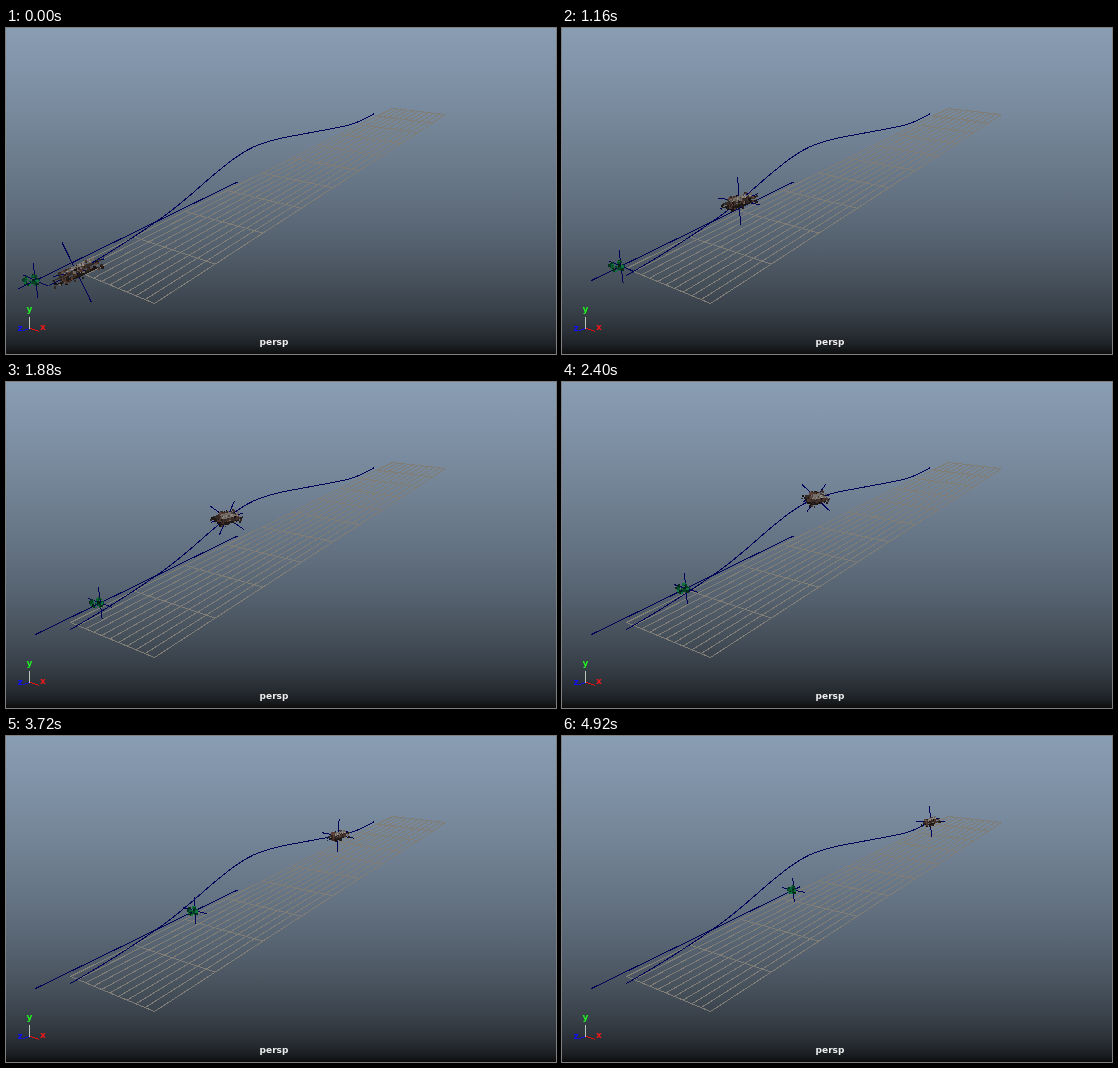
Recreate the animation shown at these times as an HTML page. Size 550 by 326 pixels, loop 5040 ms.

```html
<!DOCTYPE html>
<html lang="en">
<head>
<meta charset="utf-8">
<title>Viewport</title>
<style>
  html, body { margin: 0; width: 100%; height: 100%; overflow: hidden; background: #0d0d0d; }
  svg { display: block; width: 550px; height: 326px; shape-rendering: crispEdges; }
  path { fill: none; stroke: #000058; }
  text { font: bold 9px "DejaVu Sans", sans-serif; }
</style>
</head>
<body>
<svg id="stage" viewBox="-.5 -.5 550 326">
  <path id="grid" style="stroke: #807c76"/>
  <path id="rail" d="M29 252L231 153.5"/>
  <path id="track" d="M64 247C94 230 124 211 150 193C187 168 209 140 240 122C260 110.5 285 108 310 103C336 98 346 98 368 85"/>
  <g id="actors"></g>
  <path style="stroke: #b9c4b9" d="M23 288V300"/>
  <path style="stroke: #e01010" d="M24 300L33 303"/>
  <path style="stroke: #1010e0" d="M23 300L17 302"/>
  <text x="20" y="283.5" fill="#20f020">y</text>
  <text x="33.5" y="301.5" fill="#f01818">x</text>
  <text x="11" y="302.5" fill="#1010f0">z</text>
  <text x="267.5" y="316.5" fill="#eee" text-anchor="middle">persp</text>
</svg>
<script>
const LOOP = 5040, LAST = 63;
const byId = id => document.getElementById(id);
const mix = (a, b, s) => a + (b - a) * s;
const pt = p => p.map(v => v.toFixed(1)).join(" ");
const add = (p, ...terms) => terms.reduce((q, [k, v]) => [q[0] + k * v[0], q[1] + k * v[1]], p);
const polar = (length, degrees) => {
  const a = degrees * Math.PI / 180;
  return [length * Math.cos(a), length * Math.sin(a)];
};

// Backdrop blended in linear light
const TOP = [137, 157, 179], BOTTOM = [13, 13, 13], GAMMA = 2.2, BANDS = 40;
const stops = Array.from({ length: BANDS + 1 }, (_, i) =>
  `rgb(${TOP.map((v, c) => mix(v ** GAMMA, BOTTOM[c] ** GAMMA, i / BANDS) ** (1 / GAMMA))})`);
byId("stage").style.background = `linear-gradient(${stops})`;

// Perspective map of the unit square to the floor
function floorPoint(u, v) {
  const g = -.1149, h = 1.2155, w = 1 + g * u + h * v;
  return [(64 + (148 * (1 + g) - 64) * u + (386 * (1 + h) - 64) * v) / w,
    (240 + (275 * (1 + g) - 240) * u + (80 * (1 + h) - 240) * v) / w];
}

let gridPath = "";
for (let s = 0; s <= 10; s++) {
  const line = (a, b) => `M${pt(floorPoint(...a))}L${pt(floorPoint(...b))}`;
  gridPath += line([s / 10, 0], [s / 10, 1]) + line([0, s / 10], [1, s / 10]);
}
byId("grid").setAttribute("d", gridPath);

// Even travel into the distance, as seen on screen
const recede = e => 1.9 * e / (1 + .9 * e);

function along(id, share) {
  const path = byId(id), p = path.getPointAtLength(share * path.getTotalLength());
  return [p.x, p.y];
}

function specks(count, seed, colours) {
  const rnd = () => (seed = seed * 16807 % 2147483647) / 2147483647;
  return Array.from({ length: count }, () => ({
    a: rnd() * 2 - 1, b: rnd() * 2 - 1, h: rnd(),
    size: 1 + rnd(), fill: colours[Math.floor(rnd() * colours.length)]
  }));
}
const HULL = specks(90, 7717, ["#17120f", "#231b18", "#332a26", "#4a332b", "#5f4036", "#6d6560"]);
const DECK = specks(14, 3181, ["#4a423d", "#928b86", "#5d544e"]);
const LEAVES = specks(50, 1913, ["#032114", "#04301c", "#054225", "#075a32", "#0b7440"]);

const locator = (c, arms) => `<path d="${arms.map(v =>
  `M${pt(add(c, [1, v]))}L${pt(add(c, [-1, v]))}`).join("")}"/>`;
const polygon = (points, fill) => `<polygon points="${points.map(pt).join(" ")}" fill="${fill}"/>`;
const dot = (p, size, fill) =>
  `<rect x="${(p[0] - size / 2).toFixed(1)}" y="${(p[1] - size / 2).toFixed(1)}" width="${size.toFixed(1)}" height="${size.toFixed(1)}" fill="${fill}"/>`;

function car(u) {
  const c = along("track", mix(.02, 1, recede(u + .9 * u ** 6 * (1 - u))));
  const near = 1 / (1 + 1.2 * u);
  const bank = Math.exp(-(((u - .48) / .24) ** 2));
  const up = polar(33.5 * near * (1 - .22 * bank), -117 + 23 * u + 50 * bank);
  const side = polar(24 * near ** .65 * (1 + .1 * bank), -12 + 12 * u + 50 * bank);
  const fwd = polar(31 * near ** 1.7, -26 + 12 * bank);
  const at = (a, b, h) => add(c, [a, fwd], [b, side], [h, up]);
  const slab = (a, b, h) => polygonPoints.map(([i, j]) => at(i * a, j * b, h));
  const polygonPoints = [[-1, -1], [1, -1], [1, 1], [-1, 1]];
  let out = locator(c, [up, side, fwd]);
  out += polygon(slab(.6, .3, -.12), "#1f1916") + polygon(slab(.6, .3, .03), "#352b27");
  for (const s of HULL) out += dot(at(s.a * .68, s.b * .38, s.h * .36 - .2), s.size * (.6 + near), s.fill);
  out += polygon(slab(.36, .17, .14), "#746d68");
  for (const s of DECK) out += dot(at(s.a * .42, s.b * .2, .14), s.size * (.4 + near * .6), s.fill);
  return out;
}

function drone(u) {
  const share = recede(u * u * (1.6 - .6 * u)), near = 1 - share;
  const c = along("rail", share), r = 4 + 4.5 * near;
  const blob = add(c, [1.8 + 2.7 * near, [-1, 0]]);
  let out = locator(c, [polar(12.5 + 5 * near, -93 - 5 * near),
    polar(12 + near, 12 + 12 * near), polar(7 + 13 * near * near, -26)]);
  for (const s of LEAVES) {
    const [dx, dy] = polar(r * Math.sqrt(s.h), s.a * 180);
    out += dot(add(blob, [1, [dx, dy * (.95 - .3 * near)]]), s.size * 1.3, s.fill);
  }
  return out;
}

// Every fifteenth step is half as long; the closing pose comes last
const startOf = k => k === LAST ? 4920 : 80 * k - 40 * Math.floor((k + 3) / 15);

let shown = -1;
function draw() {
  const t = performance.now() % LOOP;
  let k = 0;
  while (k < LAST && startOf(k + 1) <= t) k++;
  if (k !== shown) byId("actors").innerHTML = drone(k / LAST) + car(k / LAST);
  shown = k;
  requestAnimationFrame(draw);
}
draw();
</script>
</body>
</html>
```
